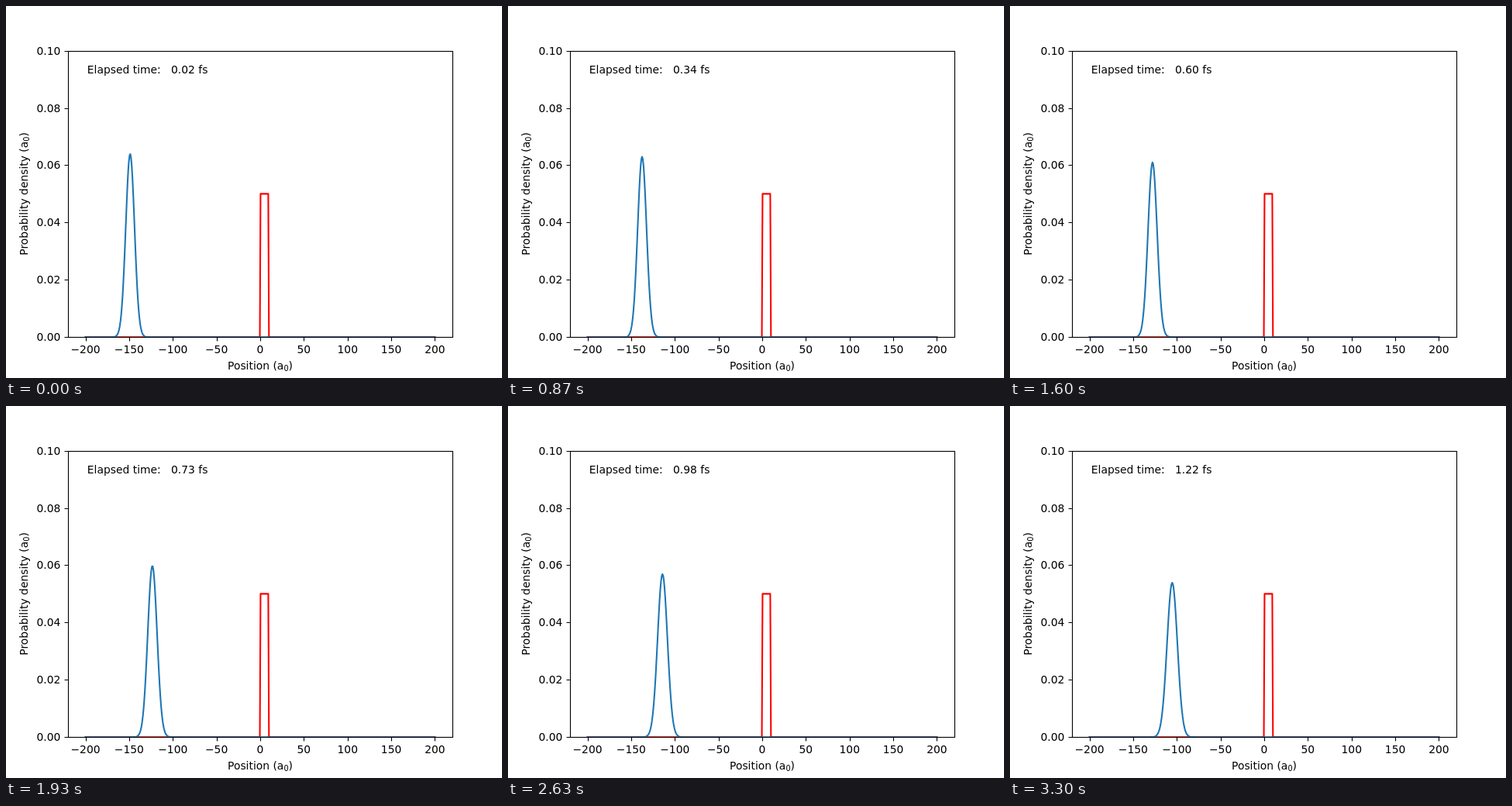
Animation, 640 px wide and 480 px high, one loop 3330 ms. Source, as an HTML page:

```html
<!DOCTYPE html>
<html lang="en">
<head>
<meta charset="utf-8">
<title>Wave packet and barrier</title>
<style>
  html, body { margin: 0; width: 100%; height: 100%; overflow: hidden; background: #fff; }
  svg { display: block; width: 640px; height: 480px; }
  text { font: 13.889px "DejaVu Sans", sans-serif; fill: #000; white-space: pre; }
  .sub { font-size: 9.722px; }
  .axis { fill: none; stroke: #000; stroke-width: 1.111; }
  .line { fill: none; stroke-width: 2.083; stroke-linecap: square; stroke-linejoin: round; }
</style>
</head>
<body>
<svg viewBox="0 0 640 480" xmlns="http://www.w3.org/2000/svg">
  <defs><clipPath id="plot"><rect x="80" y="58" width="496" height="369"/></clipPath></defs>
  <rect width="640" height="480" fill="#fff"/>
  <g clip-path="url(#plot)">
    <path id="barrier" class="line" stroke="#f00"/>
    <path id="wave" class="line" stroke="#1f77b4"/>
  </g>
  <path id="ticks" class="axis"/>
  <rect class="axis" x="80.5" y="58.5" width="496" height="369"/>
  <g id="labels"></g>
  <text x="328" y="469" text-anchor="middle">Position (a<tspan class="sub" dy="2.3">0</tspan><tspan dy="-2.3">)</tspan></text>
  <text transform="translate(28 242.4) rotate(-90)" text-anchor="middle">Probability density (a<tspan class="sub" dy="2.3">0</tspan><tspan dy="-2.3">)</tspan></text>
  <text id="clock" x="104.8" y="87" xml:space="preserve"></text>
</svg>
<script>
const LOOP = 3330;
const POINTS = 500, DX = 400 / (POINTS - 1);
const SIGMA = 5, START = -149.75, K0 = 1;
const DT = 0.5, FS_PER_UNIT = 0.0241888;
const PEAK = DX / (SIGMA * Math.sqrt(2 * Math.PI));

const $ = id => document.getElementById(id);
const px = x => 328 + x * 496 / 440;
const py = y => 427.2 - y * 3696;
const grid = Array.from({ length: POINTS }, (_, i) => -200 + i * DX);
const toPath = values =>
  'M' + values.map((v, i) => px(grid[i]).toFixed(2) + ' ' + py(v).toFixed(2)).join('L');

// Plane waves of the packet, with the phase each gains per time step on the grid
const modes = [];
for (let j = -48; j <= 48; j++) {
  const k = K0 + j * 0.0125;
  const energy = (1 - Math.cos(k * DX)) / (DX * DX);
  modes.push({
    k,
    weight: Math.exp(-((SIGMA * (k - K0)) ** 2)),
    turn: 2 * Math.atan(energy * DT / 2)
  });
}
const total = modes.reduce((sum, m) => sum + m.weight, 0);

function density(x, steps) {
  const d = x - START;
  if (Math.abs(d - 0.442 * steps) > 60) return 0;
  let re = 0, im = 0;
  for (const m of modes) {
    const phase = m.k * d - m.turn * steps;
    re += m.weight * Math.cos(phase);
    im += m.weight * Math.sin(phase);
  }
  return PEAK * (re * re + im * im) / (total * total);
}

function addLabel(x, y, anchor, str) {
  const t = document.createElementNS('http://www.w3.org/2000/svg', 'text');
  t.setAttribute('x', x);
  t.setAttribute('y', y);
  t.setAttribute('text-anchor', anchor);
  t.textContent = str;
  $('labels').append(t);
}

function drawAxes() {
  let d = '';
  for (let v = -200; v <= 200; v += 50) {
    d += `M${Math.round(px(v)) + 0.5} 427.5v5`;
    addLabel(px(v), 448, 'middle', String(v).replace('-', '\u2212'));
  }
  for (let i = 0; i <= 5; i++) {
    const y = py(i * 0.02);
    d += `M80.5 ${Math.round(y) + 0.5}h-5`;
    addLabel(70.3, Math.round(y + 5), 'end', (i * 0.02).toFixed(2));
  }
  $('ticks').setAttribute('d', d);
  $('barrier').setAttribute('d', toPath(grid.map(x => (x >= 0 && x <= 10 ? 0.05 : 0))));
}

let shown = -1;
function render(ms) {
  const tick = Math.floor((ms % LOOP) / 10);
  const index = Math.floor((3 * tick + 1) / 10);
  if (index === shown) return;
  shown = index;
  const steps = index + 2;
  $('wave').setAttribute('d', toPath(grid.map(x => density(x, steps))));
  const fs = (steps * DT * FS_PER_UNIT).toFixed(2);
  $('clock').textContent = `Elapsed time: ${fs.padStart(6)} fs`;
}

drawAxes();
const begin = performance.now();
function loop() {
  render(performance.now() - begin);
  requestAnimationFrame(loop);
}
loop();
</script>
</body>
</html>
```
